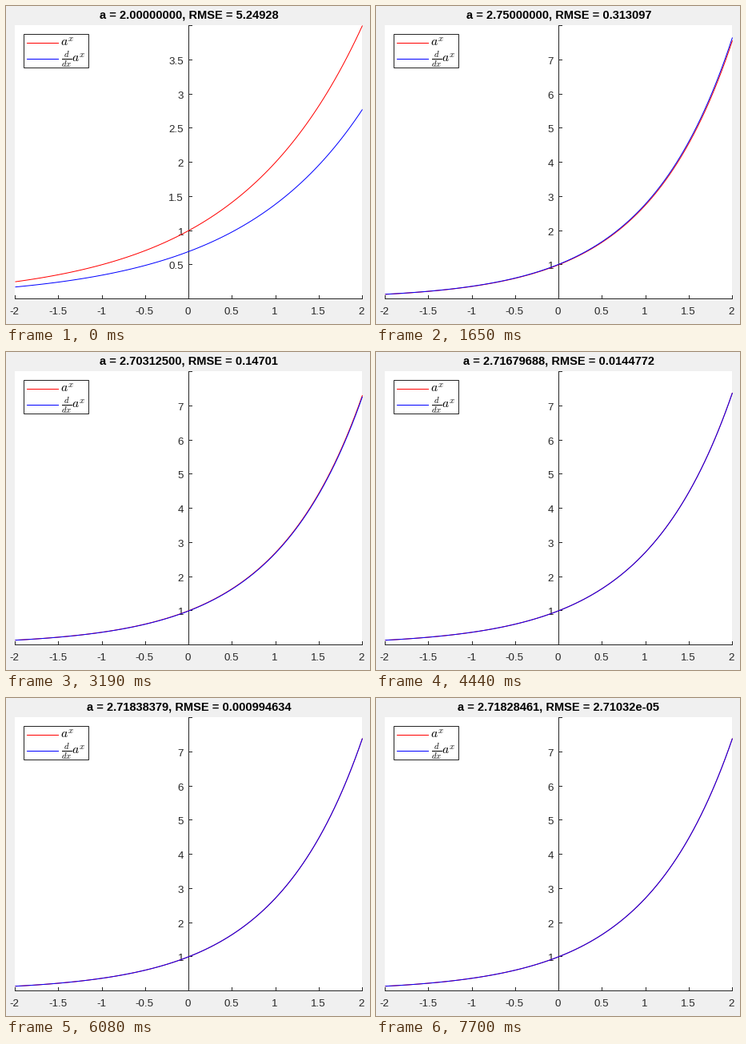
Animation of 455 by 398 pixels, one loop 8000 ms. Source, as a matplotlib script:

```python
import math

import matplotlib.pyplot as plt
import numpy as np
from matplotlib.animation import FuncAnimation
from matplotlib.collections import LineCollection
from matplotlib.patches import Rectangle

W, H, DPI = 455, 398, 64
LEFT, RIGHT, TOP, BOTTOM = 11.5, 445.5, 24.5, 366.5
INK = "#262626"
STEP_MS, LOOP_MS = 20, 8000
STARTS = [0, 840, 1170, 1650, 2030, 2410, 2810, 3190, 3660, 4060, 4440,
          4840, 5220, 5680, 6080, 6460, 6840, 7300, 7700]

plt.rcParams["font.family"] = "Liberation Sans"
plt.rcParams["mathtext.fontset"] = "cm"


def pt(px):
    return px * 72 / DPI


def bisect_e(count):
    """The two ends of [2, 3], then the midpoints closing in on e."""
    lo, hi = 2.0, 3.0
    bases = [lo, hi]
    while len(bases) < count:
        mid = (lo + hi) / 2
        bases.append(mid)
        if math.log(mid) < 1:
            lo = mid
        else:
            hi = mid
    return bases


def to_x(x):
    return LEFT + (x + 2) / 4 * (RIGHT - LEFT)


def to_y(y, top):
    return BOTTOM - y / top * (BOTTOM - TOP)


def rule(x0, y0, x1, y1, color=INK, z=2):
    """A crisp line from one whole pixel to another, both included."""
    ax.plot([x0, x1], [y0, y1], color=color, lw=pt(1), snap=True,
            solid_capstyle="projecting", zorder=z)


def curve(color, z):
    return ax.plot(to_x(xs), xs, color=color, lw=pt(1),
                   solid_capstyle="butt", zorder=z)[0]


def label(x, y, text, px, color=INK, ha="center", **kw):
    return ax.text(x, y, text, fontsize=pt(px), color=color, ha=ha,
                   va="baseline", **kw)


fig = plt.figure(figsize=(W / DPI, H / DPI), dpi=DPI, facecolor="#f0f0f0")
ax = fig.add_axes([0, 0, 1, 1])
ax.set_xlim(0, W)
ax.set_ylim(H, 0)
ax.axis("off")

ax.add_patch(Rectangle((11, 24), 434, 342, fc="white", ec="none", zorder=0))

# Axes and the fixed x ticks
rule(11, 366, 445, 366)
rule(228, 24, 228, 366)
for v in np.arange(-2, 2.1, 0.5):
    x = math.floor(to_x(v))
    rule(x, 362, x, 366)
    label(to_x(v) - 1.1, 386, f"{v:g}", 13.33)

y_ticks = LineCollection([], colors=INK, linewidths=pt(1), snap=True,
                         capstyle="projecting", zorder=2)
ax.add_collection(y_ticks)
y_labels = [label(222, 0, "", 13.33, ha="right", zorder=2) for _ in range(9)]

xs = np.linspace(-2, 2, 100)
power = curve("red", 3)
slope = curve("blue", 4)
title = label(228.4, 16, "", 14.67, "black", weight="bold")

# Legend
ax.add_patch(Rectangle((22, 35), 81, 42, fc="white", ec=INK, lw=pt(1),
                       snap=True, zorder=5))
rule(26, 46, 65, 46, "red", 6)
rule(26, 66, 65, 66, "blue", 6)
label(68, 51, r"$a^x$", 15.5, "black", "left", zorder=6)
label(69, 70, r"$\frac{d}{dx}a^x$", 15.5, "black", "left", zorder=6)

bases = bisect_e(len(STARTS))


def show(a):
    f = a ** xs
    df = math.log(a) * f
    peak = max(f[-1], df[-1])
    step = 0.5 if peak <= 4 else 1
    top = math.ceil(peak / step - 1e-9) * step
    count = round(top / step)

    power.set_ydata(to_y(f, top))
    slope.set_ydata(to_y(df, top))
    rows = [math.floor(to_y(k * step, top)) for k in range(1, count + 1)]
    y_ticks.set_segments([[(228, y), (232, y)] for y in rows])
    for k, text in enumerate(y_labels):
        shown = k < count - 1
        text.set_text(f"{(k + 1) * step:g}" if shown else "")
        if shown:
            text.set_y(rows[k] + 6)
    error = np.linalg.norm(f - df)
    title.set_text(f"a = {a:.8f}, RMSE = {error:g}")


def update(i):
    now = i * STEP_MS + STEP_MS / 2
    show(bases[np.searchsorted(STARTS, now, side="right") - 1])
    return power, slope, title


anim = FuncAnimation(fig, update, frames=LOOP_MS // STEP_MS,
                     interval=STEP_MS, repeat=True, repeat_delay=0)
plt.show()
```
